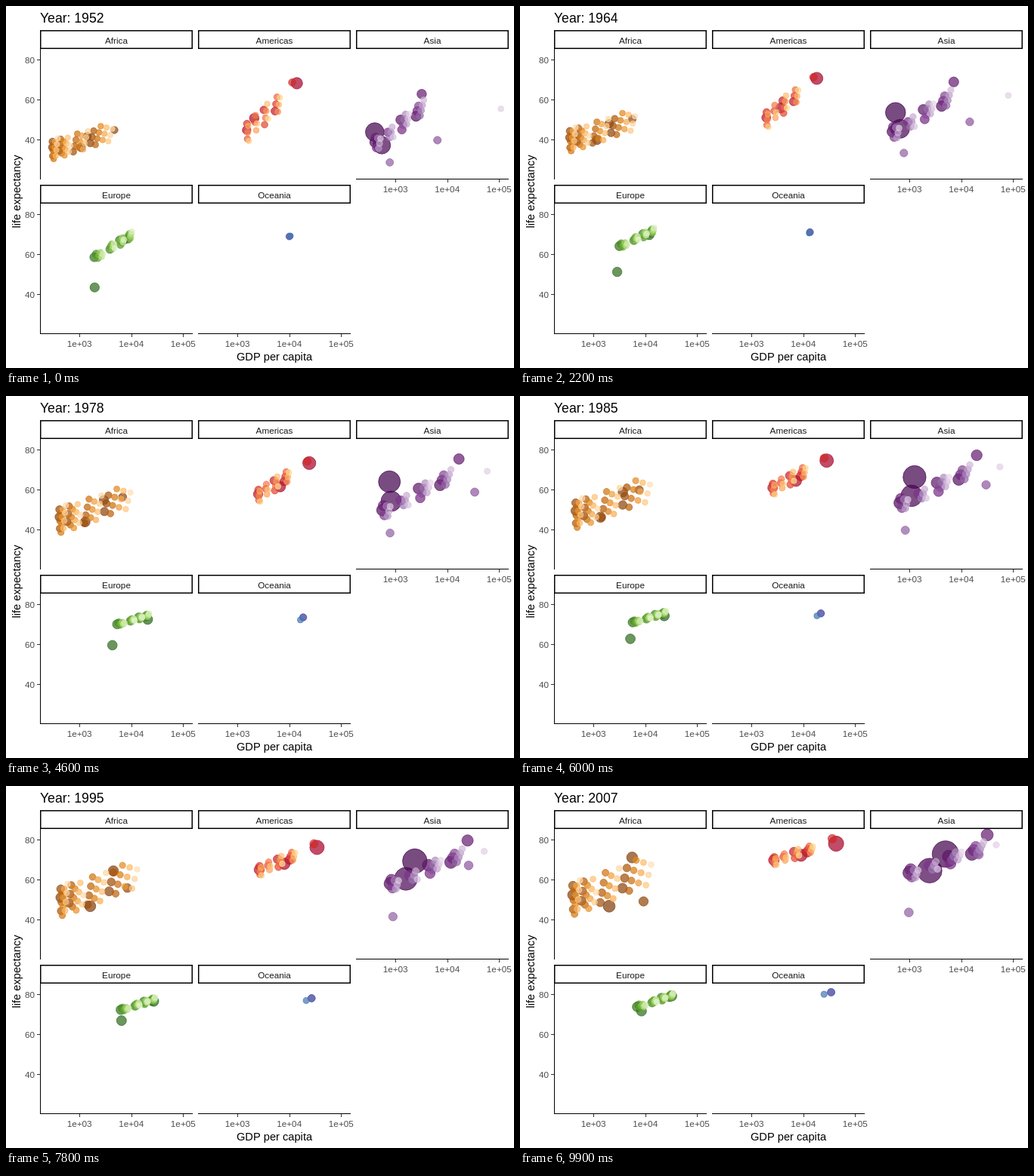
Animation, 672 px wide and 480 px high, one loop 10000 ms. Source, as an HTML page with a canvas:

```html
<!DOCTYPE html>
<html lang="en">
<head>
<meta charset="utf-8">
<title>Life expectancy and GDP per capita</title>
<style>
html, body { margin: 0; width: 100%; height: 100%; overflow: hidden; background: #fff; }
canvas { display: block; }
</style>
</head>
<body>
<canvas id="stage" width="672" height="480"></canvas>
<script>
const ctx = document.getElementById('stage').getContext('2d');
const FIRST = 1952, LAST = 2007, STEPS = 100;

// A row holds GDP and life expectancy in FIRST, in the panel's mid year and in LAST.
// Countries are ranked by population: "known" gives single rows by rank,
// the others spread between the rows "low" and "high".
const panels = [
  {
    name: 'Africa', x: 45, y: 32, count: 52, mid: 1987, growth: 3.8, yAxis: true,
    ramp: '#7f3b08 #b35806 #e08214 #fdb863 #fee0b6',
    pop: k => 135 / (1 + .3 * k) * Math.exp(-k / 30),
    skew: 1.7, tie: .5,
    low: [300, 30, 460, 41, 400, 42],
    high: [4300, 50, 13000, 70, 13000, 75],
    known: {
      0: [1077, 36.3, 1385, 46.9, 2014, 46.9],
      1: [1419, 41.9, 3885, 59.8, 5581, 71.3],
      4: [4725, 45, 7826, 60.8, 9270, 49.3]
    }
  },
  {
    name: 'Americas', x: 254, y: 32, count: 25, mid: 1977, growth: 2.5,
    ramp: '#a50026 #d73027 #f46d43 #fdae61 #fee090',
    pop: k => 301 / (1 + .9 * k) * Math.exp(-k / 12),
    skew: 1.3, tie: .65,
    low: [1500, 38, 2500, 53, 2700, 67],
    high: [9000, 69, 13000, 74, 22000, 80],
    known: {
      0: [13990, 68.4, 24073, 73.4, 42952, 78.2],
      1: [2109, 50.9, 6660, 61.5, 9066, 72.4],
      5: [11367, 68.8, 22091, 74.2, 36319, 80.7]
    }
  },
  {
    name: 'Asia', x: 463, y: 32, count: 33, mid: 1977, growth: 2.5, xAxis: true,
    ramp: '#40004b #762a83 #9970ab #c2a5cf #e7d4e8',
    pop: k => k < 2 ? 1318 - 208 * k : 270 * Math.exp(-.13 * k),
    skew: 1.2, tie: .75,
    low: [400, 34, 550, 45, 1000, 60],
    high: [5000, 64, 19000, 74, 46000, 82],
    known: {
      0: [400, 44, 741, 64, 4959, 73],
      1: [547, 37.4, 813, 54.2, 2452, 64.7],
      5: [3217, 63, 16610, 75.4, 31656, 82.6],
      13: [6460, 39.9, 34168, 58.7, 21655, 72.8],
      14: [779, 28.8, 786, 38.4, 975, 43.8],
      31: [108382, 55.6, 59265, 69.3, 47307, 77.6]
    }
  },
  {
    name: 'Europe', x: 45, y: 237, count: 30, mid: 1977, growth: 1.35, xAxis: true, yAxis: true,
    ramp: '#276419 #4d9221 #7fbc41 #b8e186 #e6f5d0',
    pop: k => 82 * Math.exp(-.14 * k),
    skew: .7, tie: .8,
    low: [1800, 56, 5000, 69, 6500, 72.5],
    high: [12000, 73, 25000, 76, 40000, 81.5],
    known: {
      0: [7144, 67.5, 20513, 72.5, 32170, 79.4],
      1: [1969, 43.6, 4269, 59.5, 8458, 71.8]
    }
  },
  {
    name: 'Oceania', x: 254, y: 237, count: 2, mid: 1977, growth: 2.3, xAxis: true,
    ramp: '#313695 #4575b4',
    pop: k => 20 - 16 * k,
    known: {
      0: [10040, 69.1, 18334, 73.5, 34435, 81.2],
      1: [10557, 69.4, 16234, 72.2, 25185, 80.2]
    }
  }
];

const mix = (a, b, t) => a + (b - a) * t;
const gdpX = log => 52.1 + (log - 3) * 68.6;
const lifeY = life => 39.7 + (80 - life) * 2.65;
const radius = pop => ((2 + 10 * Math.sqrt(pop / 1318)) * 2.845 + .945) / 2;

// Odd columns are life expectancy; GDP is handled as a logarithm.
const toLog = row => row.map((v, i) => i % 2 ? v : Math.log10(v));

function spread(p, k) {
  const wealth = ((.5 + k * .7549) % 1) ** p.skew;
  const health = mix((.5 + k * .5698) % 1, wealth, p.tie);
  const high = toLog(p.high);
  return toLog(p.low).map((v, i) => mix(v, high[i], i % 2 ? health : wealth));
}

function rampColor(stops, t) {
  const pos = t * (stops.length - 1), i = Math.min(Math.floor(pos), stops.length - 2);
  const part = (hex, c) => parseInt(hex.substr(1 + c * 2, 2), 16);
  return `rgba(${[0, 1, 2].map(c => Math.round(mix(part(stops[i], c), part(stops[i + 1], c), pos - i)))},.7)`;
}

for (const p of panels) {
  const stops = p.ramp.split(' ');
  p.countries = Array.from({ length: p.count }, (_, k) => ({
    row: p.known[k] ? toLog(p.known[k]) : spread(p, k),
    color: rampColor(stops, k / (p.count - 1)),
    pop: p.pop(k)
  }));
}

function text(str, x, y, size, color, align = 'center') {
  ctx.font = `${size}px "Liberation Sans", Arial, sans-serif`;
  ctx.fillStyle = color;
  ctx.textAlign = align;
  ctx.fillText(str, x, y);
}

function box(x, y, w, h, color) {
  ctx.fillStyle = color;
  ctx.fillRect(x, y, w, h);
}

function drawPoints(p, year) {
  const late = year > p.mid, at = late ? 2 : 0;
  const t = late ? (year - p.mid) / (LAST - p.mid) : (year - FIRST) / (p.mid - FIRST);
  const share = p.growth ** ((year - LAST) / (LAST - FIRST));
  ctx.lineWidth = .945;
  for (const { row, color, pop } of p.countries) {
    const x = p.x + gdpX(mix(row[at], row[at + 2], t));
    const y = p.y + lifeY(mix(row[at + 1], row[at + 3], t));
    ctx.beginPath();
    ctx.arc(x, y, radius(pop * share), 0, 7);
    ctx.fillStyle = ctx.strokeStyle = color;
    ctx.fill();
    ctx.stroke();
  }
}

function drawFrame(p) {
  const { x, y } = p;
  box(x, y, 202, 25, '#000');
  box(x + 1.5, y + 1.5, 199, 22, '#fff');
  text(p.name, x + 101, y + 18, 11.73, '#1a1a1a');
  if (p.yAxis) {
    box(x, y + 25, 1, 173, '#000');
    for (const life of [40, 60, 80]) {
      const ty = Math.round(y + lifeY(life));
      box(x - 4, ty - 1, 4, 1, '#333');
      text(life, x - 7, ty + 4, 11.73, '#4d4d4d', 'right');
    }
  }
  if (p.xAxis) {
    box(x, y + 197, 202, 1, '#000');
    for (const log of [3, 4, 5]) {
      const tx = x + gdpX(log);
      box(Math.round(tx), y + 198, 1, 4, '#333');
      text('1e+0' + log, tx, y + 215, 11.73, '#4d4d4d');
    }
  }
}

function draw(now) {
  const step = Math.floor(now / 100) % STEPS;
  const year = mix(FIRST, LAST, step / (STEPS - 1));
  box(0, 0, 672, 480, '#fff');
  for (const p of panels) {
    drawPoints(p, year);
    drawFrame(p);
  }
  text('Year: ' + Math.round(year), 45, 22, 17.6, '#000', 'left');
  text('GDP per capita', 355, 470, 14.67, '#000');
  ctx.save();
  ctx.translate(19, 246);
  ctx.rotate(-Math.PI / 2);
  text('life expectancy', 0, 0, 14.67, '#000');
  ctx.restore();
}

const start = performance.now();
function loop() {
  draw(performance.now() - start);
  requestAnimationFrame(loop);
}
loop();
</script>
</body>
</html>
```
